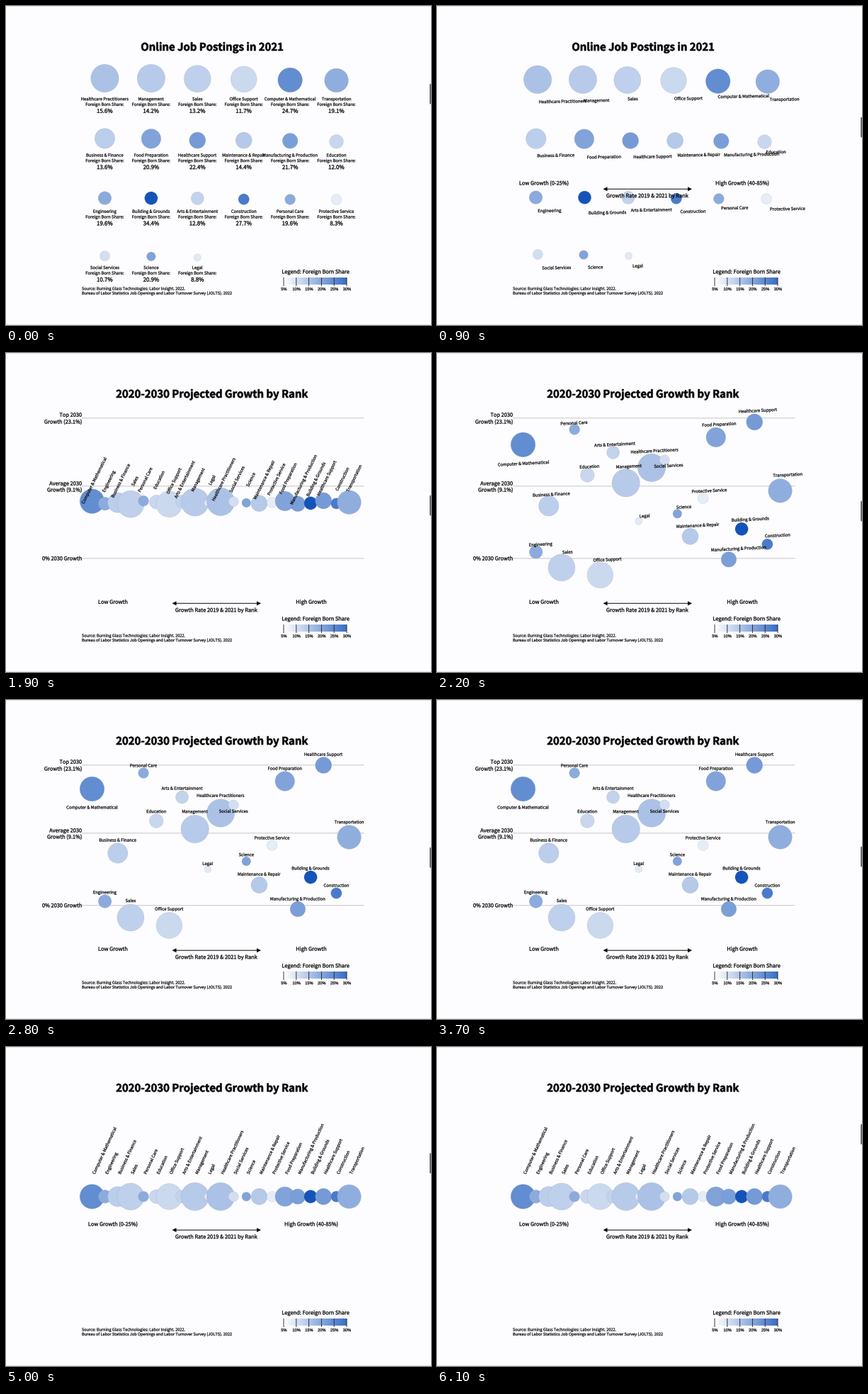
A matplotlib script that plays this animation: 600 by 450 pixels, repeating every 6.2 s.

```python
import numpy as np
import matplotlib.pyplot as plt
from matplotlib.animation import FuncAnimation
from matplotlib.patches import Circle, FancyBboxPatch, PathPatch, Polygon
from matplotlib.textpath import TextPath
from matplotlib.transforms import Affine2D

W, H, DPI = 600, 450, 100
FRAMES, STEP = 62, 100
PX = 72 / DPI
SANS = "Noto Sans CJK JP"
INK = "#050505"

# Moments at which each transition begins, in ms
TO_LINE, TO_SCATTER, BACK_TO_LINE = 821, 1812, 4480
MOVE = 500

ORIGIN = np.array([107.0, 54.0])
TILT = -65
LINE_Y, LINE_LABEL_Y = 211, 180

# In growth order: name, foreign born share, radius, scatter y, grid cell
JOBS = [
    ("Computer & Mathematical", 24.7, 17.3, 125.5, 4),
    ("Engineering", 19.6, 9.3, 284, 12),
    ("Business & Finance", 13.6, 14.2, 216, 6),
    ("Sales", 13.2, 19.0, 307, 2),
    ("Personal Care", 19.6, 7.4, 103, 16),
    ("Education", 12.0, 9.8, 170.5, 11),
    ("Office Support", 11.7, 18.4, 318, 3),
    ("Arts & Entertainment", 12.8, 9.0, 137, 14),
    ("Management", 14.2, 19.7, 182, 1),
    ("Legal", 8.8, 4.9, 238.5, 20),
    ("Healthcare Practitioners", 15.6, 19.7, 159.5, 0),
    ("Social Services", 10.7, 7.0, 148, 18),
    ("Science", 20.9, 6.3, 227.5, 19),
    ("Maintenance & Repair", 14.4, 11.5, 261, 9),
    ("Protective Service", 8.3, 7.3, 205, 17),
    ("Food Preparation", 20.9, 13.8, 114.5, 7),
    ("Manufacturing & Production", 21.7, 10.8, 295, 10),
    ("Building & Grounds", 34.4, 9.2, 250, 13),
    ("Healthcare Support", 22.4, 11.5, 92, 8),
    ("Construction", 27.7, 7.7, 272.5, 15),
    ("Transportation", 19.1, 16.8, 193.5, 5),
]
# Labels that hang below their bubble in the scatter view
BELOW = {"Computer & Mathematical": 28, "Social Services": 11}


def share_color(share):
    k = (share - 8.3) / (34.4 - 8.3)
    low, high = np.array([230, 237, 247]), np.array([20, 84, 186])
    return np.clip((low + (high - low) * k) / 255, 0, 1)


def ease(t, start):
    u = np.clip((t - start) / MOVE, 0, 1)
    return 4 * u**3 if u < 0.5 else 1 - (2 - 2 * u) ** 3 / 2


fig = plt.figure(figsize=(W / DPI, H / DPI), dpi=DPI, facecolor="#fdfcfe")
ax = fig.add_axes([0, 0, 1, 1])
ax.axis("off")


def glyphs(text, size, family=SANS, weight="normal"):
    return TextPath((0, 0), text, size=size,
                    prop={"family": family, "weight": weight})


def ink_patch(path, size, zorder):
    # A hairline stroke gives the text its full, dark weight
    return ax.add_patch(PathPatch(path, fc=INK, ec=INK, lw=0.04 * size * PX,
                                  zorder=zorder))


def write(x, y, text, size, align="center", zorder=4, **font):
    path = glyphs(text, size, **font)
    box = path.get_extents()
    shift = {"left": 0, "center": -(box.x0 + box.x1) / 2, "right": -box.x1}
    place = Affine2D().scale(1, -1).translate(x + shift[align], y)
    return ink_patch(place.transform_path(path), size, zorder)


def rule(x0, x1, y0, y1, color=INK, width=1.0, zorder=4):
    return ax.plot([x0, x1], [y0, y1], color=color, lw=width * PX,
                   solid_capstyle="butt", snap=False, zorder=zorder)[0]


def growth_axis(y, low, high, label_y):
    parts = [write(151, label_y, low, 7.4), write(431, label_y, high, 7.4),
             write(297, y + 12, "Growth Rate 2019 & 2021 by Rank", 7.45),
             rule(237, 358, y, y)]
    for tip, d in ((234.5, 1), (360, -1)):
        head = Polygon([(tip, y), (tip + 6 * d, y - 3), (tip + 6 * d, y + 3)],
                       fc=INK, lw=0, zorder=4)
        parts.append(ax.add_patch(head))
    return parts


def show(parts, visible):
    for part in parts:
        part.set_visible(visible)


# Static page parts
for edge in (0.5, H - 0.5):
    rule(0, W, edge, edge, "#e3e3e5", 1)
write(107, 400.6, "Source: Burning Glass Technologies: Labor Insight. 2022.",
      5.56, "left")
write(107, 407, "Bureau of Labor Statistics Job Openings and Labor Turnover "
      "Survey (JOLTS). 2022", 5.56, "left")

write(437.3, 377.4, "Legend: Foreign Born Share", 7.4)
ramp = np.array([[share_color(s) for s in np.linspace(5, 30, 200)]])
ax.imshow(ramp, extent=(392, 481, 393, 383), aspect="auto", zorder=3)
for i in range(6):
    x = 392 + 17.8 * i
    rule(x, x, 383, 395, "#222222", 0.9)
    write(x + 0.4, 401.2, f"{5 + 5 * i}%", 5.7, family="Liberation Sans")

# Parts belonging to single views
first_title = [write(291, 63, "Online Job Postings in 2021", 14.88,
                     weight="bold")]
second_title = [write(291, 63, "2020-2030 Projected Growth by Rank", 14.88,
                      weight="bold")]
line_parts = growth_axis(258.2, "Low Growth (0-25%)", "High Growth (40-85%)",
                         252.4)
scatter_parts = growth_axis(353.2, "Low Growth", "High Growth", 353.7)
for y in (91.8, 187.8, 289.8):
    scatter_parts.append(rule(107, 505.5, y, y, "#c6c6c8", 1, 1))
for y, text in ((89.8, "Top 2030"), (99.6, "Growth (23.1%)"),
                (186.6, "Average 2030"), (195.6, "Growth (9.1%)"),
                (292.4, "0% 2030 Growth")):
    scatter_parts.append(write(106.7, y, text, 7.4, "right"))

# Bubbles, labels and their pose in each view:
# bubble x, y, label translation x, y, label x, y, label angle
grid, line, scatter = [], [], []
bubbles, labels, grid_parts = [], [], []
a = np.radians(TILT)
turn = np.array([[np.cos(a), -np.sin(a)], [np.sin(a), np.cos(a)]])

for i, (name, share, r, rise, cell) in enumerate(JOBS):
    row, col = divmod(cell, 6)
    gx, base = 139.5 + 65.4 * col, 121.7 + 79.3 * row
    lx = 121.5 + 18.15 * i
    label_y = rise + BELOW.get(name, -1.15 * r)

    grid.append([gx, base - r, 0, 0, *((gx, base + 11.5) - ORIGIN), 0])
    pivot = (lx + 4, LINE_LABEL_Y) - ORIGIN
    line.append([lx, LINE_Y, *(pivot - turn @ pivot), *pivot, TILT])
    scatter.append([lx, rise, 0, 0, *((lx, label_y) - ORIGIN), 0])

    bubble = Circle((0, 0), r, fc=share_color(share),
                    ec=(0.52, 0.57, 0.66, 0.45), lw=0.35 * PX, zorder=2)
    bubbles.append(ax.add_patch(bubble))
    path = glyphs(name, 5.92)
    box = path.get_extents()
    labels.append((ink_patch(path, 5.92, 5), (box.x0 + box.x1) / 2))

    grid_parts.append(write(gx, base + 19.2, "Foreign Born Share:", 5.88))
    grid_parts.append(write(gx, base + 29.1, f"{share}%", 7.9))

grid, line, scatter = (np.array(v, float) for v in (grid, line, scatter))

thumb = ax.add_patch(FancyBboxPatch(
    (599, 0), 4, 26.6, boxstyle="round,pad=1,rounding_size=1.2",
    fc="#6c6c6e", lw=0, zorder=6))

ax.set_xlim(0, W)
ax.set_ylim(H, 0)


def pose_at(t):
    if t < TO_SCATTER:
        start, end, k = grid, line, ease(t, TO_LINE)
    elif t < BACK_TO_LINE:
        start, end, k = line, scatter, ease(t, TO_SCATTER)
    else:
        start, end, k = scatter, line, ease(t, BACK_TO_LINE)
    return start + (end - start) * k


def draw(frame):
    t = frame * STEP
    in_grid = t < TO_LINE
    in_scatter = TO_SCATTER <= t < BACK_TO_LINE
    centred = in_grid or in_scatter

    show(grid_parts, in_grid)
    show(scatter_parts, in_scatter)
    show(line_parts, not centred)
    show(first_title, t < TO_SCATTER)
    show(second_title, t >= TO_SCATTER)

    for pose, bubble, (patch, middle) in zip(pose_at(t), bubbles, labels):
        x, y, tx, ty, px, py, angle = pose
        bubble.center = x, y
        place = (Affine2D().translate(-middle if centred else 0, 0)
                 .scale(1, -1).translate(px, py).rotate_deg(angle)
                 .translate(tx + ORIGIN[0], ty + ORIGIN[1]))
        patch.set_transform(place + ax.transData)

    thumb.set_y(0.8 + np.interp(
        t, [0, 900, 1300, 2200, 3700, 4700, 6100],
        [110, 157, 185, 209, 207, 161, 109]))
    return []


anim = FuncAnimation(fig, draw, frames=FRAMES, interval=STEP,
                     repeat=True, repeat_delay=0, blit=False)
plt.show()
```
